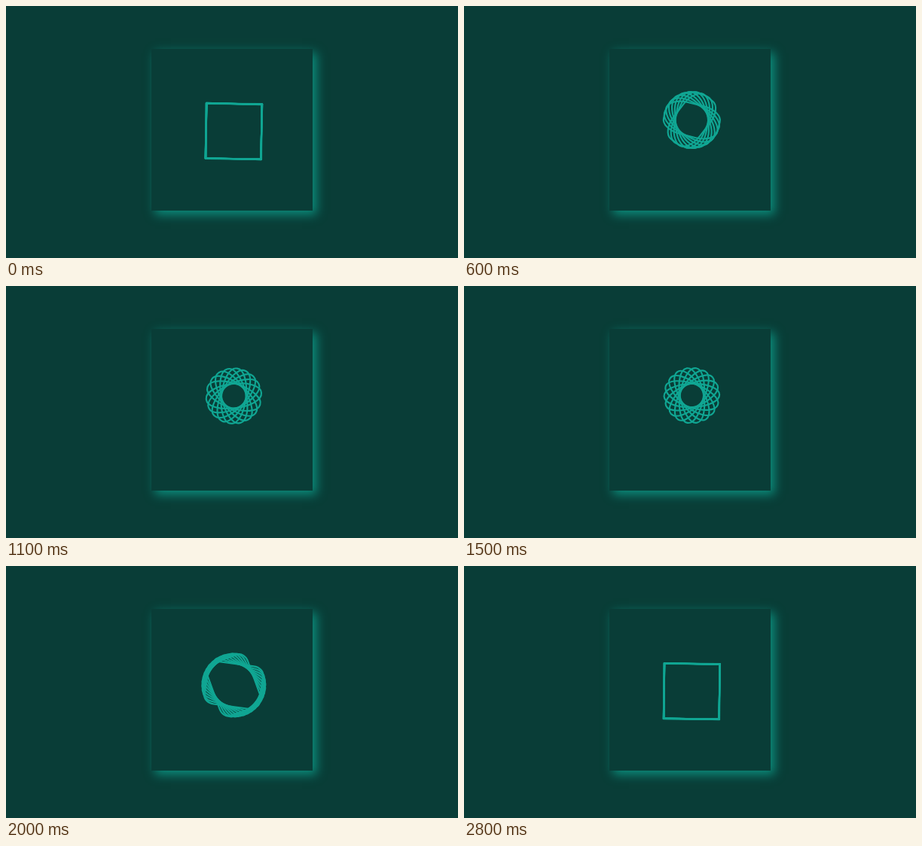
Write an HTML page that moves like this. It is 600 by 335 pixels and loops after 2900 ms.

```html
<!DOCTYPE html>
<html lang="en">
<head>
<meta charset="utf-8">
<title>Spirograph loader</title>
<style>
  html, body { margin: 0; width: 100%; height: 100%; overflow: hidden; background: #093d37; }
  .card {
    position: absolute; left: 193px; top: 57px; width: 214px; height: 215px;
    background: #093d37; box-shadow: 5px 5px 13px #0c8f7e;
  }
  svg { position: absolute; left: 0; top: 0; }
  rect { fill: none; stroke: #10a693; stroke-width: 2.14; }
</style>
</head>
<body>
<div class="card"></div>
<svg width="600" height="335"></svg>
<script>
const LOOP = 2900, STEP = 100, PHASE = 30, HALF = 1500;
const COUNT = 9, TURN = 20;
const LEFT = 264.5, TOP = 128.9, SIZE = 75.7, FLAT = 32.9, LINE = 2.14;

const svg = document.querySelector('svg');
const rings = Array.from({ length: COUNT }, () =>
  svg.appendChild(document.createElementNS('http://www.w3.org/2000/svg', 'rect')));

// cubic-bezier(.25, .1, .25, 1)
function ease(x) {
  let s = x;
  for (let i = 0; i < 8; i++) {
    s -= (0.75 * s * (1 - s) + s ** 3 - x) / (0.75 - 1.5 * s + 3 * s * s);
  }
  return 0.3 * s * (1 - s) ** 2 + 3 * s * s * (1 - s) + s ** 3;
}

function draw(time) {
  const t = Math.floor(time % LOOP / STEP) * STEP + PHASE;
  const p = t < HALF ? ease(t / HALF) : 1 - ease((t - HALF) / HALF);
  const height = SIZE + (FLAT - SIZE) * p;
  const cx = LEFT + SIZE / 2, cy = TOP + height / 2;
  const radius = side => Math.max(0, side * p / 2 - LINE / 2);

  rings.forEach((ring, i) => {
    const attrs = {
      x: LEFT + LINE / 2, y: TOP + LINE / 2,
      width: SIZE - LINE, height: height - LINE,
      rx: radius(SIZE), ry: radius(height),
      transform: `rotate(${(i + 1) * TURN * p} ${cx} ${cy})`
    };
    for (const name in attrs) ring.setAttribute(name, attrs[name]);
  });
}

const start = performance.now();
function tick() {
  draw(performance.now() - start);
  requestAnimationFrame(tick);
}
tick();
</script>
</body>
</html>
```
